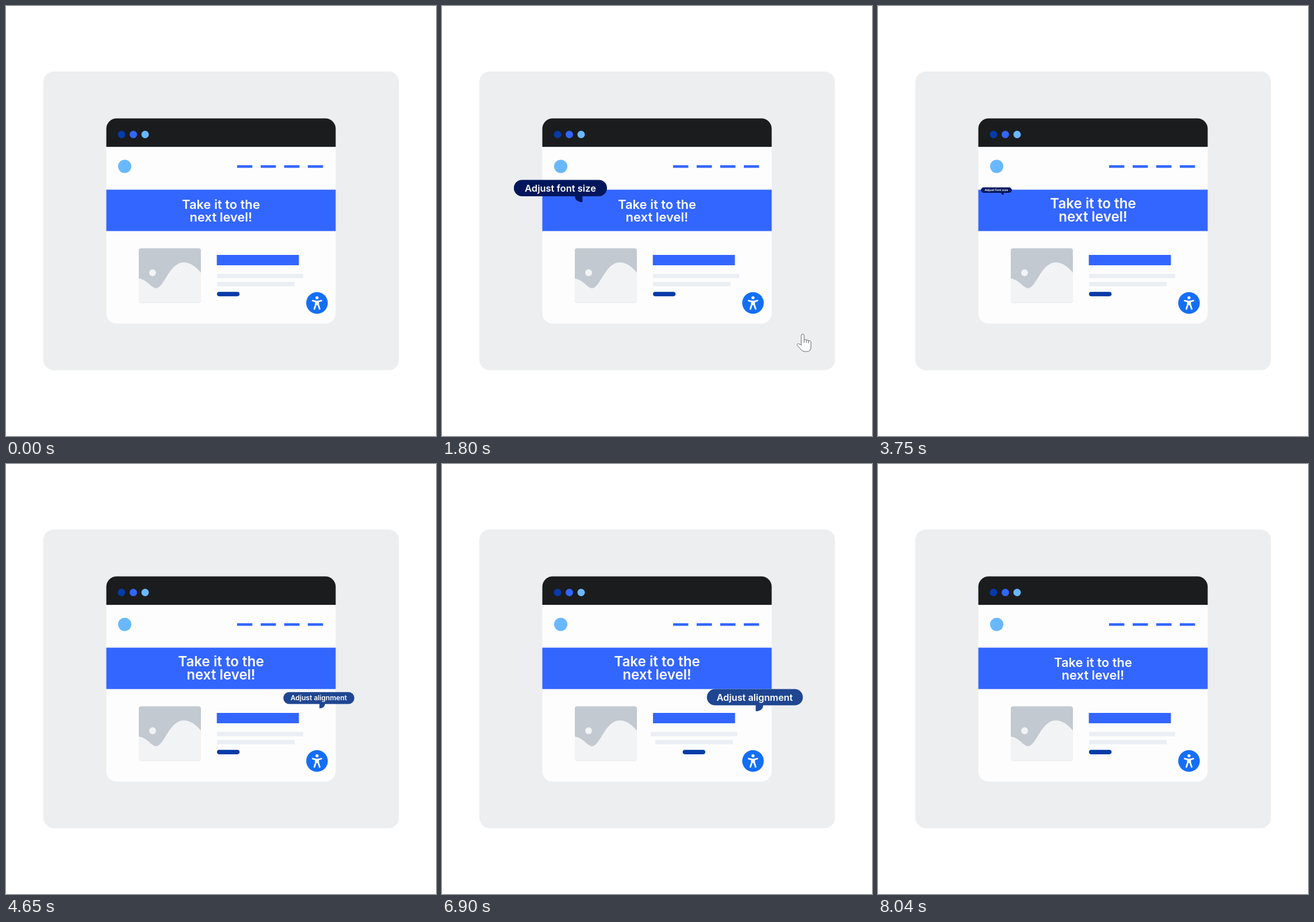
An HTML page for the animation above (9 s loop, 748x748 px).

```html
<!DOCTYPE html>
<html lang="en">
<head>
<meta charset="utf-8">
<title>Adjustable page</title>
<style>
html, body { margin: 0; width: 100%; height: 100%; overflow: hidden; background: #fff; }
svg { display: block; width: 100vw; height: 100vh; }
text { font-family: Inter, "Open Sans", sans-serif; font-weight: 600; fill: #fff; text-anchor: middle; }
.tip text { font-size: 16.5px; }
</style>
</head>
<body>
<svg viewBox="0 0 748 748">
  <defs>
    <clipPath id="windowShape"><rect x="174.5" y="195.5" width="399" height="357" rx="18"/></clipPath>
    <clipPath id="photoShape"><rect x="231" y="421.5" width="108" height="95" rx="4"/></clipPath>
  </defs>
  <rect x="65" y="114" width="618.5" height="519.5" rx="18" fill="#eceef0"/>

  <g clip-path="url(#windowShape)">
    <path d="M174 195h400v358h-400z" fill="#fdfdfd"/>
    <path d="M174 195h400v50h-400z" fill="#1b1c1d"/>
    <path d="M174 319.5h400v72h-400z" fill="#36f"/>
  </g>
  <circle cx="201" cy="223.5" r="6.5" fill="#063ba8"/>
  <circle cx="221.5" cy="223.5" r="6.5" fill="#36f"/>
  <circle cx="242" cy="223.5" r="6.5" fill="#69b8ff"/>
  <circle cx="206.5" cy="279" r="11.5" fill="#69b8ff"/>
  <path d="M402 279.2H552" stroke="#36f" stroke-width="4.4" stroke-dasharray="26.5 14.5"/>

  <g id="smallText" font-size="22">
    <text x="374" y="352.6">Take it to the</text>
    <text x="374" y="375">next level!</text>
  </g>
  <g id="largeText" font-size="24.2">
    <text x="374" y="352.4">Take it to the</text>
    <text x="374" y="375.2">next level!</text>
  </g>

  <g clip-path="url(#photoShape)">
    <path d="M231 421h108v96h-108z" fill="#c2c9d0"/>
    <path d="M231 474C246 476 253 491 261 491C275 491 284 446 309 446C321 446 331 454 339 464V517H231z" fill="#f1f3f5"/>
    <circle cx="255" cy="464" r="6" fill="#f1f3f5"/>
  </g>

  <g id="leftCopy">
    <path d="M366.7 433h142.8v18h-142.8z" fill="#36f"/>
    <path d="M367 466h150v7.5h-150zM367 480h135v7.5h-135z" fill="#ebeef2"/>
    <rect x="367" y="497.3" width="39.3" height="7.6" rx="3.8" fill="#063ba8"/>
  </g>
  <g id="centerCopy">
    <path d="M367 433h142.8v18h-142.8z" fill="#36f"/>
    <path d="M363.3 466h150v7.5h-150zM371 480h135v7.5h-135z" fill="#ebeef2"/>
    <rect x="418.7" y="497.3" width="39.3" height="7.6" rx="3.8" fill="#063ba8"/>
  </g>

  <circle cx="541" cy="516.6" r="18.8" fill="#146ff8"/>
  <g fill="none" stroke="#fff" stroke-width="2.7" stroke-linecap="round" stroke-linejoin="round">
    <circle cx="541" cy="507.6" r="2.7" fill="#fff" stroke="none"/>
    <path d="M533.3 512.6Q541 515.6 548.7 512.6M539 515V519L536.4 527M543 515V519L545.6 527"/>
    <path d="M539.2 515H542.8V519H539.2z" fill="#fff"/>
  </g>

  <g id="fontTip" class="tip" fill="#00175c">
    <rect x="125" y="302.4" width="162" height="28.6" rx="14.3"/>
    <path d="M231 330C231 337 236 341.3 244.3 341.3V330z"/>
    <text x="206" y="322.7">Adjust font size</text>
  </g>
  <g id="alignTip" class="tip" fill="#1f4691">
    <rect x="459.5" y="391.3" width="169.5" height="28.6" rx="14.3"/>
    <path d="M559 419C559 426 554 430.3 545.7 430.3V419z"/>
    <text x="544" y="411.6">Adjust alignment</text>
  </g>

  <g id="hand" fill="#fff" stroke="#555" stroke-width=".9" stroke-linejoin="round" stroke-linecap="round">
    <path d="M7.7 17.5V3A2.5 2.5 0 0 1 12.7 3V10.5Q14.8 8.8 16.6 11Q18.8 9.7 20.5 12Q24.6 11.2 24.6 15V23Q24.6 30.8 17 30.8H14Q10.5 30.8 8 28L1 20.5C-.6 18.5 1.6 16.5 3.6 17.4L7.7 19.5z"/>
    <path d="M12.7 10.5V15.5M16.6 11V15.5M20.5 12V16"/>
  </g>
</svg>
<script>
const LOOP = 9000, STEP = 30;
const el = id => document.getElementById(id);
const ramp = (t, from, to) => Math.min(1, Math.max(0, (t - from) / (to - from)));
const easeInOut = p => (1 - Math.cos(Math.PI * p)) / 2;

function crossFade(from, to, p) {
  el(from).style.opacity = 1 - p;
  el(to).style.opacity = p;
}

function popTip(id, x, y, t, [in0, in1, out0, out1]) {
  const grow = 1 - (1 - ramp(t, in0, in1)) ** 2;
  const shrink = 1 - ramp(t, out0, out1) ** 1.4;
  const s = grow * shrink;
  el(id).style.display = s > 0 ? "" : "none";
  el(id).setAttribute("transform", `translate(${x} ${y}) scale(${s}) translate(${-x} ${-y})`);
}

// u runs along a curve from the button (0) to the far corner (1)
function placeHand(u) {
  const bend = 2 * u * (1 - u), end = u * u;
  const x = 538.2 + 100 * bend + 97 * end;
  const y = 522.2 + 22 * bend + 122 * end;
  el("hand").setAttribute("transform", `translate(${x} ${y})`);
  el("hand").style.opacity = Math.min(1, (1 - u) * 12);
}

function draw(now) {
  const t = Math.floor(now % LOOP / STEP) * STEP;
  placeHand(t < 900 ? 1 - easeInOut(ramp(t, 0, 600)) : easeInOut(ramp(t, 1400, 2150)));
  popTip("fontTip", 206, 322, t, [870, 1590, 3210, 3930]);
  popTip("alignTip", 544, 411, t, [4290, 5040, 6870, 7470]);
  const back = ramp(t, 7770, 8040);
  crossFade("smallText", "largeText", ramp(t, 1890, 2250) - back);
  crossFade("leftCopy", "centerCopy", ramp(t, 5370, 5730) - back);
}

const start = performance.now();
function tick() {
  draw(performance.now() - start);
  requestAnimationFrame(tick);
}
tick();
</script>
</body>
</html>
```
